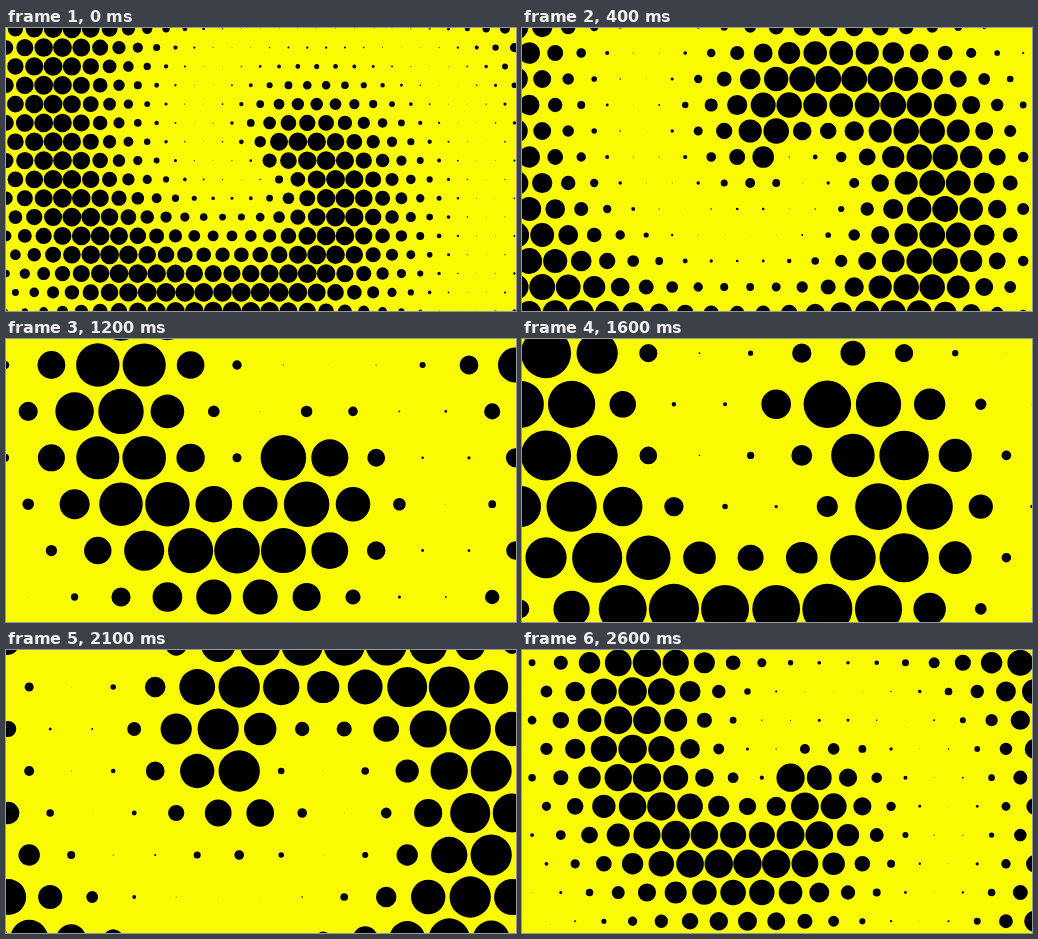
These frames come from a looping animation (510x283 px, 2700 ms). An HTML page with a canvas:

```html
<!DOCTYPE html>
<html lang="en">
<head>
<meta charset="utf-8">
<title>Halftone spiral</title>
<style>
  html, body { margin: 0; width: 100%; height: 100%; overflow: hidden; background: #fafa00; }
  canvas { display: block; }
</style>
</head>
<body>
<canvas id="stage" width="510" height="283"></canvas>
<script>
const W = 510, H = 283, LOOP = 2700, STEP = 100;
const CX = 254.2, CY = 142;
const ctx = document.getElementById('stage').getContext('2d');

// Grid pitch at a few moments (seconds, pixels)
const KNOTS = [[0, 18.83], [0.4, 26], [0.8, 36], [1.2, 46.4], [1.6, 51.15], [2.1, 42], [2.6, 28.72]];

// Local cubic interpolation of the dot density, which varies almost quadratically
function pitch(t) {
  let i = 0;
  while (i < KNOTS.length - 4 && t > KNOTS[i + 2][0]) i++;
  const near = KNOTS.slice(i, i + 4);
  let density = 0;
  for (const [a, s] of near) {
    let w = 1 / s;
    for (const [b] of near) if (b !== a) w *= (t - b) / (a - b);
    density += w;
  }
  return 1 / density;
}

function draw(t) {
  const s = pitch(t);
  const turn = 1.07 + 4.355 * t;
  const x0 = CX + s / 2, y0 = CY - s / 2;
  const rows = Math.ceil(H / s / 2) + 2, cols = Math.ceil(W / s / 2) + 2;

  ctx.fillStyle = '#fafa00';
  ctx.fillRect(0, 0, W, H);
  ctx.fillStyle = '#000';
  ctx.beginPath();
  for (let j = -rows; j <= rows; j++) {
    const shift = j & 1 ? 0.5 : 0;
    for (let i = -cols; i <= cols; i++) {
      const dx = (i + shift) * s, dy = j * s;
      const phase = 0.0196 * Math.hypot(dx, dy) - Math.atan2(dy, dx) - turn;
      const r = 0.3 + 0.485 * s * (1 + Math.cos(phase)) / 2;
      ctx.moveTo(x0 + dx + r, y0 + dy);
      ctx.arc(x0 + dx, y0 + dy, r, 0, 2 * Math.PI);
    }
  }
  ctx.fill();
}

const start = performance.now();
function tick() {
  const ms = (performance.now() - start) % LOOP;
  draw(Math.floor(ms / STEP) * STEP / 1000);
  requestAnimationFrame(tick);
}
tick();
</script>
</body>
</html>
```
